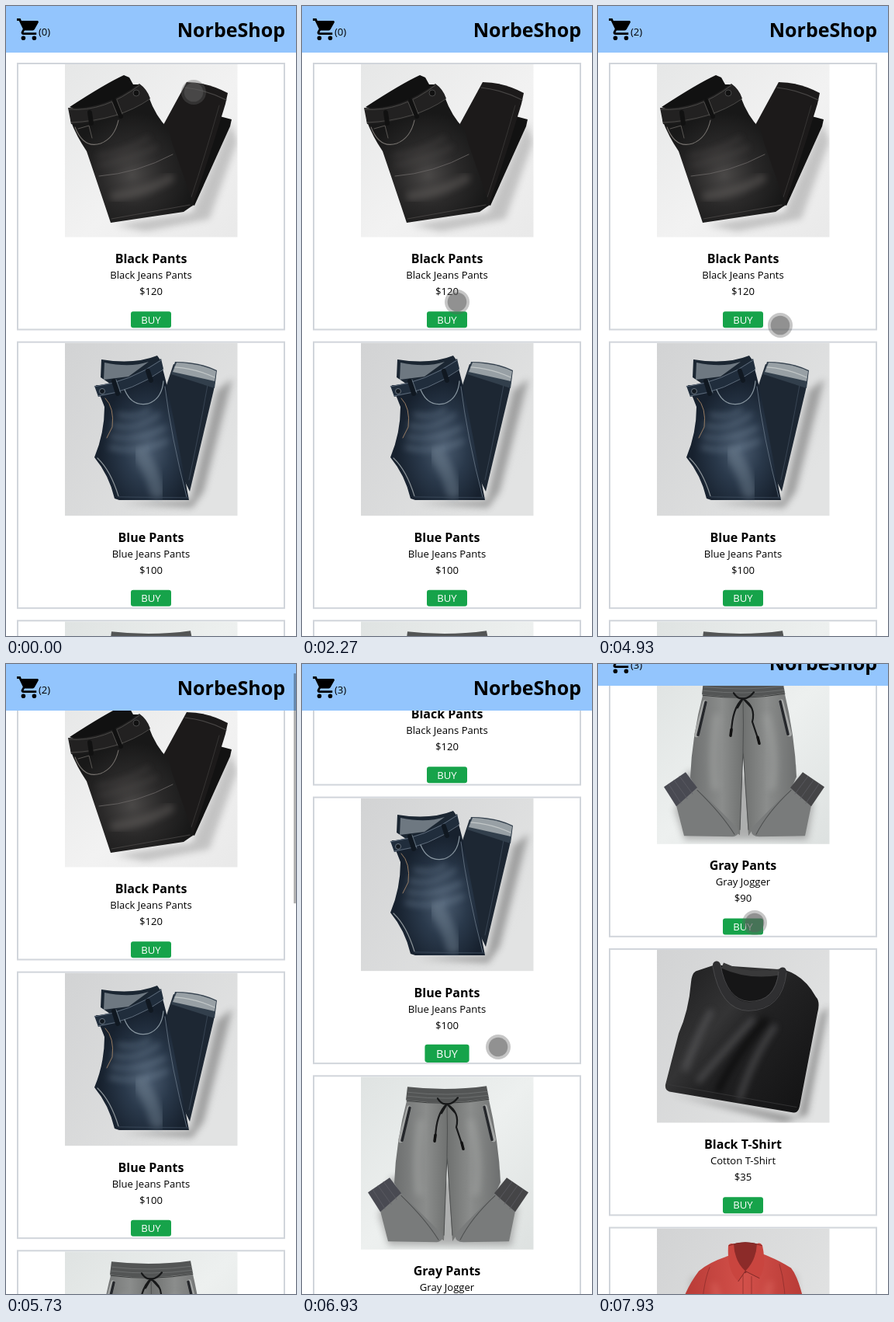
Write an HTML page that moves like this. It is 374 by 811 pixels and loops after 8000 ms.

```html
<!DOCTYPE html>
<html lang="en">
<head>
<meta charset="utf-8">
<title>Shop</title>
<style>
  html, body { margin: 0; width: 100%; height: 100%; overflow: hidden; background: #fff; }
  svg { display: block; }
  text { font: 13.1px "Open Sans", "Noto Sans", sans-serif; }
  .name { font-size: 16px; font-weight: 700; }
  .brand { font-size: 25px; font-weight: 700; }
  .mid { text-anchor: middle; }
  .seam { fill: none; stroke-linecap: round; }
</style>
</head>
<body>
<svg id="stage" width="374" height="811" viewBox="0 0 374 811">
  <defs>
    <linearGradient id="paper" x2="1" y2="1">
      <stop stop-color="#e6e7e7"/><stop offset=".55" stop-color="#f2f2f2"/><stop offset="1" stop-color="#e9e9e9"/>
    </linearGradient>
    <linearGradient id="wall" x2="1" y2=".6">
      <stop stop-color="#d2d3d4"/><stop offset="1" stop-color="#e2e3e3"/>
    </linearGradient>
    <linearGradient id="mist" x2="1" y2="1">
      <stop stop-color="#dfe3e2"/><stop offset=".5" stop-color="#edf0ef"/><stop offset="1" stop-color="#dde1e0"/>
    </linearGradient>
    <radialGradient id="coal" cx=".5" cy=".62" r=".5">
      <stop stop-color="#4a4847"/><stop offset=".5" stop-color="#2a2929"/><stop offset="1" stop-color="#181818"/>
    </radialGradient>
    <radialGradient id="denim" cx=".56" cy=".62" r=".5">
      <stop stop-color="#4b5c70"/><stop offset=".5" stop-color="#2a394b"/><stop offset="1" stop-color="#17212e"/>
    </radialGradient>
    <linearGradient id="fleece" x2="1">
      <stop stop-color="#6d6f6f"/><stop offset=".3" stop-color="#8b8d8c"/><stop offset=".5" stop-color="#6f7170"/>
      <stop offset=".72" stop-color="#8b8d8c"/><stop offset="1" stop-color="#6d6f6f"/>
    </linearGradient>
    <linearGradient id="cotton" x2="1" y2=".8">
      <stop stop-color="#1b1b1c"/><stop offset=".4" stop-color="#343435"/><stop offset=".55" stop-color="#222223"/>
      <stop offset="1" stop-color="#141415"/>
    </linearGradient>
    <linearGradient id="coral" x2="1">
      <stop stop-color="#b83b36"/><stop offset=".5" stop-color="#d2504a"/><stop offset="1" stop-color="#b83b36"/>
    </linearGradient>
    <filter id="soft" x="-30%" y="-30%" width="160%" height="160%"><feGaussianBlur stdDeviation="4"/></filter>
  </defs>
  <g id="page"></g>
  <g id="header">
    <rect width="374" height="60" fill="#93c5fd"/>
    <path transform="translate(12.6 13.3) scale(1.4)" d="M7 18a2 2 0 1 0 0 4 2 2 0 0 0 0-4zM1 2v2h2l3.6 7.6-1.35 2.44A2 2 0 0 0 7 17h12v-2H7.4q-.3-.1-.2-.4L8.1 13h7.45q1.2 0 1.75-1l3.6-6.5Q21.300 4.200 20 4H5.200L4.300 2zM17 18a2 2 0 1 0 0 4 2 2 0 0 0 0-4z"/>
    <text id="count" x="42" y="38"></text>
    <text class="brand" x="360" y="40" text-anchor="end">NorbeShop</text>
  </g>
  <rect id="thumb" x="371" width="3" height="296" fill="#000" fill-opacity=".3"/>
  <g id="touch">
    <circle r="16" fill="#606060" fill-opacity=".36"/>
    <circle r="12.300" fill="#5c5c5c" fill-opacity=".5"/>
  </g>
</svg>
<script>
const LOOP = 8000, STEP = 200 / 3, PITCH = 358.65;
const $ = id => document.getElementById(id);

const shape = (d, fill, more = '') => `<path d="${d}" fill="${fill}" ${more}/>`;
const seam = (d, color, width = 1, more = '') =>
  `<path class="seam" d="${d}" stroke="${color}" stroke-width="${width}" ${more}/>`;
const shade = (d, color, opacity) => shape(d, color, `opacity="${opacity}" filter="url(#soft)"`);
const glow = (d, color, width, opacity) => seam(d, color, width, `opacity="${opacity}" filter="url(#soft)"`);

const blackPants =
  shade('M140 282L240 266 290 150 298 175 262 274 180 290z', '#999', .5) +
  shape('M272 141L291 146 289 155 243 257 228 250z', '#121212') +
  shape('M233 98Q260 98 286 112L283 126Q264 190 240 258L204 205 203 153Z', '#1c1a1a') +
  seam('M231 105Q258 108 284 121', '#474544', 1.2) +
  seam('M275 128Q256 195 239 246', '#3d3b3a', .8) +
  shape('M82 130Q128 100 152 89L159 92 164 101 172 101 183 119 120 145z', '#111') +
  shape('M83 147Q140 146 184 117Q193 142 209 158Q212 166 214 176L242 256 229 265 135 279Q119 231 104 187Q91 168 83 147Z', 'url(#coal)') +
  shape('M80 131Q125 135 172 100Q182 107 186 119Q146 149 84 152Z', '#222121') +
  seam('M81 133Q127 137 172 102M84 150Q146 147 185 120', '#555351', .8) +
  seam('M108 137l2 14M140 122l8 20', '#111', 6) +
  seam('M137 124l7 17M143 121l7 18', '#5a5856', .8) +
  '<circle cx="168" cy="112" r="4" fill="#111" stroke="#555" stroke-width=".8"/>' +
  seam('M89 156Q100 184 122 177Q140 170 145 147', '#77736f', 1.1) +
  seam('M93 158L107 154 111 170', '#6a6663', .8) +
  seam('M120 219Q170 215 215 191', '#676462', .9) +
  seam('M136 274L237 256', '#4c4948', .8) +
  glow('M121 205Q160 195 193 182M119 193Q155 187 184 170', '#65615f', 3, .5) +
  glow('M140 245Q180 240 211 222', '#6d6966', 12, .4);

const bluePants =
  shade('M150 640L238 636 272 495 292 480 255 625 240 646z', '#777', .6) +
  shape('M216 461L271 474 268 494 237 625 205 560 203 500z', '#1d2733') +
  seam('M260 488Q248 555 236 610', '#3b4857', .9) +
  shape('M218 458Q250 458 272 469L269 492 213 474Z', '#323f4c') +
  shape('M220 459Q250 460 271 470L269 483 215 471Z', '#98a0a5') +
  seam('M218 465Q245 467 269 478', '#c3c8c9', 1.2) +
  shape('M123 455Q165 462 195 450L200 457 190 475 140 490 122 478z', '#1b2632') +
  shape('M127 459Q160 466 184 458L158 477 126 481z', '#6e7881') +
  shape('M116 488Q155 490 200 460Q207 484 211 505L236 636 146 636 140 634Q133 604 114 581Q127 550 127 516Z', 'url(#denim)') +
  shape('M114 489Q160 483 200 454L203 467Q164 496 119 503Z', '#202d3c') +
  seam('M114 490Q160 484 200 456M119 502Q164 496 203 468', '#667383', .9) +
  seam('M139 483l5 16M183 470l4 12', '#101821', 6) +
  seam('M142 481l6 17', '#71808c', .8) +
  '<circle cx="124" cy="496" r="3.500" fill="#131a22" stroke="#687480"/>' +
  seam('M153 494Q162 516 183 512Q201 506 203 483', '#8997a1', 1.2) +
  seam('M128 505Q140 517 137 542L130 556', '#987c62', 1) +
  seam('M205 490Q213 555 233 632', '#637181', .9) +
  seam('M118 582Q135 598 145 631', '#8a9297', 1.2) +
  glow('M139 540Q165 548 197 526M136 554Q165 562 205 543M134 568Q170 577 208 560M145 526Q168 532 185 520', '#7f92a5', 3, .75) +
  glow('M174 578Q190 600 195 625', '#7e8f9f', 19, .4) +
  seam('M146 632L235 633', '#3f4e60', .8);

const grayPants =
  shade('M99 710L112 748 270 748 278 702 260 670 115 660z', '#888', .6) +
  shape('M136 558L240 556Q254 615 256 667L249 682 198 737 194 743 187 632 183 742 177 738 128 683 119 668Q121 615 136 558Z', 'url(#fleece)') +
  shape('M101 704L128 681 180 733Q184 742 174 744L111 743Z', '#797b7b') +
  shape('M275 704L249 681 198 733Q196 744 208 744L267 743Z', '#797b7b') +
  shape('M85 680L113 661 128 681 101 705z', '#494a52') +
  shape('M292 680L264 661 248 681 275 705z', '#454547') +
  seam('M91 676l16 25M98 671l17 24M105 666l17 23M285 676l-17 25M278 671l-17 24M271 666l-17 23', '#606168', .7) +
  seam('M128 684Q160 715 176 741M249 684Q218 713 204 741', '#4f5151', 1.1) +
  shape('M136 544Q188 550 238 543L241 559Q188 568 134 561Z', '#535555') +
  seam('M137 551Q188 557 239 550M136 556Q188 562 240 555', '#737575', .8) +
  seam('M135 562Q188 569 241 560', '#393b3b', 1) +
  seam('M138 571L127 613M236 570L247 612', '#a4a6a5', 6) +
  seam('M139 571L129 613M235 570L245 612', '#25272b', 3.5) +
  seam('M187 566Q188 600 187 632L183 735M187 632L194 735', '#505252', 1.1) +
  glow('M153 590Q146 640 151 680M218 590Q231 640 224 680', '#a5a7a6', 9, .5) +
  seam('M175 559Q180 567 187 566Q194 567 201 558M187 566Q173 578 172 610M187 566Q204 577 199 596L207 620M187 566L180 578M187 566L198 578', '#171819', 2.200) +
  seam('M172 606l-1 8M206 616l2 8', '#111', 3.500);

const blackShirt =
  shade('M95 553L258 582 287 450 297 440 270 580 240 590z', '#666', .6) +
  shape('M150 387L126 395Q121 398 120 409Q117 446 104 475L87 541Q86 548 92 550L252 577Q258 578 260 569L283 449Q287 434 281 428Q266 401 240 393Z', 'url(#cotton)') +
  shape('M154 386Q194 400 236 392Q234 432 193 436Q162 430 154 386Z', '#161617') +
  shape('M162 384Q196 400 234 392L235 400Q194 407 159 391Z', '#39393a') +
  seam('M153 387Q161 437 194 440Q232 440 238 395', '#2f2f31', 10) +
  seam('M158 387Q166 432 195 434Q229 434 233 396M148 389Q158 445 194 446Q238 445 243 397', '#505052', .8) +
  glow('M199 458Q160 500 131 535M227 467Q198 510 183 557M145 448Q125 485 113 520', '#707072', 8, .45) +
  glow('M216 458Q176 505 155 548', '#050505', 8, .6) +
  seam('M91 541L256 570', '#39393a', .8);

const redShirt =
  shade('M120 790L255 785 275 950 110 950z', '#8f8884', .5) +
  shape('M169 761Q142 770 130 781Q117 798 109 819L126 850 136 945 243 945 246 850 265 818Q258 788 249 777Q232 766 210 758Z', 'url(#coral)') +
  shape('M169 748Q190 740 211 748L206 770 190 784 174 765z', '#8c2b29') +
  shape('M168 748Q170 744 175 746Q176 768 190 781L181 794Q166 781 168 748Z', '#c9453f') +
  shape('M212 748Q209 743 205 746Q204 767 190 781L208 790Q218 775 212 748Z', '#c9453f') +
  seam('M169 748Q190 740 211 748M181 794L190 781 208 790', '#7f2927', 1) +
  seam('M187 786v50M198 788v48', '#97312e', .9) +
  seam('M144 776Q134 800 133 850M234 772Q243 800 242 850', '#99322f', 1) +
  glow('M150 800Q160 830 158 890M222 798Q212 830 220 890', '#e5746c', 8, .4);

const items = [
  ['Black Pants', 'Black Jeans Pants', 120, 75, 'paper', blackPants],
  ['Blue Pants', 'Blue Jeans Pants', 100, 433.700, 'wall', bluePants],
  ['Gray Pants', 'Gray Jogger', 90, 531, 'mist', grayPants],
  ['Black T-Shirt', 'Cotton T-Shirt', 35, 367.500, 'wall', blackShirt],
  ['Red T-Shirt', 'Polo T-Shirt', 45, 726, 'wall', redShirt]
];

$('page').innerHTML = items.map(([name, note, price, top, back, art], i) => `
  <g transform="translate(0 ${73 + i * PITCH})">
    <rect x="15" y="1" width="344" height="342.500" fill="#fff" stroke="#d1d5db" stroke-width="2"/>
    <svg x="76" y="2" width="222.500" height="222.500" viewBox="76 ${top} 222.5 222.5">
      <rect x="76" y="${top}" width="223" height="223" fill="url(#${back})"/>${art}
    </svg>
    <text class="name mid" x="187" y="258">${name}</text>
    <text class="mid" x="187" y="278">${note}</text>
    <text class="mid" x="187" y="299">$${price}</text>
    <g class="buy">
      <rect x="-26" y="-10.500" width="52" height="21" rx="3" fill="#16a34a"/>
      <text class="mid" y="4.800" fill="#fff">BUY</text>
    </g>
  </g>`).join('');
const buttons = document.querySelectorAll('.buy');

// Rows are time followed by values, linear in between.
const finger = [
  [0, 242, 111], [70, 241, 113], [200, 256, 170], [330, 265, 203], [470, 264, 203], [530, 260, 204],
  [1340, 260, 204], [1400, 259, 204], [1600, 252, 237], [1930, 219, 350], [2200, 200, 399],
  [2270, 200, 381], [2400, 194, 404], [2930, 194, 404], [3130, 216, 411], [3330, 245, 406],
  [3530, 265, 409], [3740, 265, 409], [3930, 237, 412], [4130, 208, 405], [4270, 208, 405],
  [4330, 204, 405], [4600, 204, 405], [4930, 235, 411], [5070, 245, 410], [5270, 210, 410],
  [5330, 183, 408], [6000, 190, 482], [6270, 199, 503], [6530, 201, 504], [6870, 240, 494],
  [6930, 253, 493], [7400, 240, 440], [7870, 204, 334], [7930, 202, 333]
];
const scroll = [
  [5600, 0], [5670, 8], [5730, 36], [5800, 130], [5870, 215], [5930, 261],
  [7070, 261], [7130, 300], [7200, 415], [7330, 655], [7400, 740], [7470, 783]
];
const bar = [[5600, 0], [5670, 1], [6400, 1], [6600, 0], [7000, 0], [7070, 1], [7600, 1], [7800, 0]];
const grow = [
  [[2800, 1], [2950, 1.1], [3800, 1.1], [3950, 1]],
  [[6400, 1], [6550, 1.1]]
];
const clicks = [2870, 4530, 6470];

function at(rows, t) {
  const n = rows.findIndex(r => r[0] > t);
  if (n === 0) return rows[0].slice(1);
  if (n < 0) return rows[rows.length - 1].slice(1);
  const a = rows[n - 1], b = rows[n], k = (t - a[0]) / (b[0] - a[0]);
  return a.slice(1).map((v, j) => v + (b[j + 1] - v) * k);
}

function draw(now) {
  const t = Math.round(Math.floor(((now % LOOP) + 4) / STEP) * STEP / 10) * 10;
  const y = Math.round(at(scroll, t)[0]);
  $('page').setAttribute('transform', `translate(0 ${-y})`);
  $('header').setAttribute('transform', `translate(0 ${Math.min(0, 751 - y)})`);
  $('thumb').setAttribute('y', y * 811 / 2222 - 1);
  $('thumb').setAttribute('opacity', at(bar, t)[0]);
  $('count').textContent = `(${clicks.filter(c => c <= t).length})`;
  buttons.forEach((b, i) => {
    const s = grow[i] ? at(grow[i], t)[0] : 1;
    b.setAttribute('transform', `translate(187 330.700) scale(${s})`);
  });
  const hidden = (t >= 5470 && t < 6070) || (t >= 7070 && t < 7470);
  $('touch').setAttribute('transform', `translate(${at(finger, t).join(' ')})`);
  $('touch').setAttribute('visibility', hidden ? 'hidden' : 'visible');
}

const start = performance.now();
function tick() {
  draw(performance.now() - start);
  requestAnimationFrame(tick);
}
tick();
</script>
</body>
</html>
```
